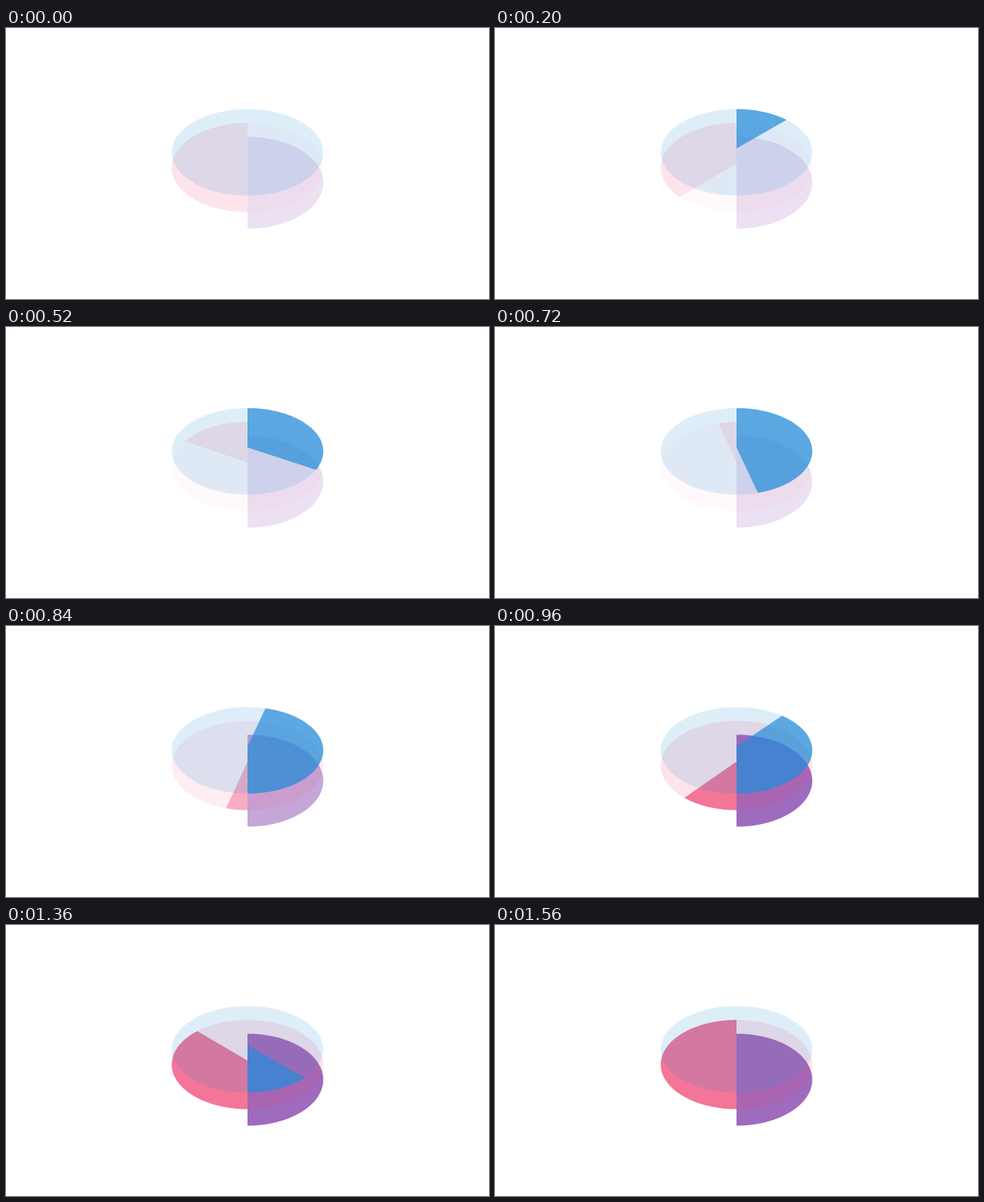
An HTML page with a canvas for the animation above (1.72 s loop, 640 by 360 pixels).

```html
<!DOCTYPE html>
<html lang="en">
<head>
<meta charset="utf-8">
<title>Stacked discs</title>
<style>
  html, body { margin: 0; width: 100%; height: 100%; overflow: hidden; background: #fff; }
  canvas { display: block; }
</style>
</head>
<body>
<canvas id="stage" width="640" height="360"></canvas>
<script>
const ctx = document.getElementById('stage').getContext('2d');

const LOOP = 1720, TICK = 40;
const STEP_MS = 21.5, STEP_DEG = 5;
const RADIUS = 100, PERSPECTIVE = 900, TILT = 54 * Math.PI / 180;
const SOLID = 0.75, PALE = 0.15, DIM = 0.2;

const BLUE = '36,139,216', PINK = '239,71,117', PURPLE = '126,58,168';

// Point on a disc tilted about its own horizontal axis; 0 degrees is the far edge.
function project(degrees, offsetY) {
  const a = degrees * Math.PI / 180;
  const depth = RADIUS * Math.cos(a);
  const scale = PERSPECTIVE / (PERSPECTIVE + depth * Math.sin(TILT));
  return [
    320 + RADIUS * Math.sin(a) * scale,
    180 + (offsetY - depth * Math.cos(TILT)) * scale
  ];
}

function sector(offsetY, from, to, rgb, alpha) {
  if (to <= from) return;
  ctx.beginPath();
  ctx.moveTo(320, 180 + offsetY);
  for (let d = from; d <= to; d++) ctx.lineTo(...project(d, offsetY));
  ctx.closePath();
  ctx.fillStyle = `rgba(${rgb},${alpha})`;
  ctx.fill();
}

function disc(offsetY, from, to, rgb, opacity) {
  sector(offsetY, to, from + 360, rgb, PALE * opacity);
  sector(offsetY, from, to, rgb, SOLID * opacity);
}

function draw(time) {
  const t = Math.floor((time % LOOP) / TICK) * TICK;
  const step = Math.min(72, Math.floor(t / STEP_MS));
  const angle = step * STEP_DEG;
  const firstHalf = angle <= 180;
  // The lower discs brighten once the sweep passes the half turn.
  const glow = Math.min(1, Math.max(DIM, DIM + 0.1 * (step - 35)));
  const lowerOpacity = firstHalf ? DIM : glow;

  ctx.clearRect(0, 0, 640, 360);
  sector(20, 0, 180, PURPLE, SOLID * lowerOpacity);

  if (firstHalf) disc(0, 180 + angle, 360, PINK, lowerOpacity);
  else disc(0, 180, angle, PINK, lowerOpacity);

  disc(-20, Math.max(0, angle - 180), Math.min(angle, 180), BLUE, 1);
}

const start = performance.now();
function frame() {
  draw(performance.now() - start);
  requestAnimationFrame(frame);
}
frame();
</script>
</body>
</html>
```
